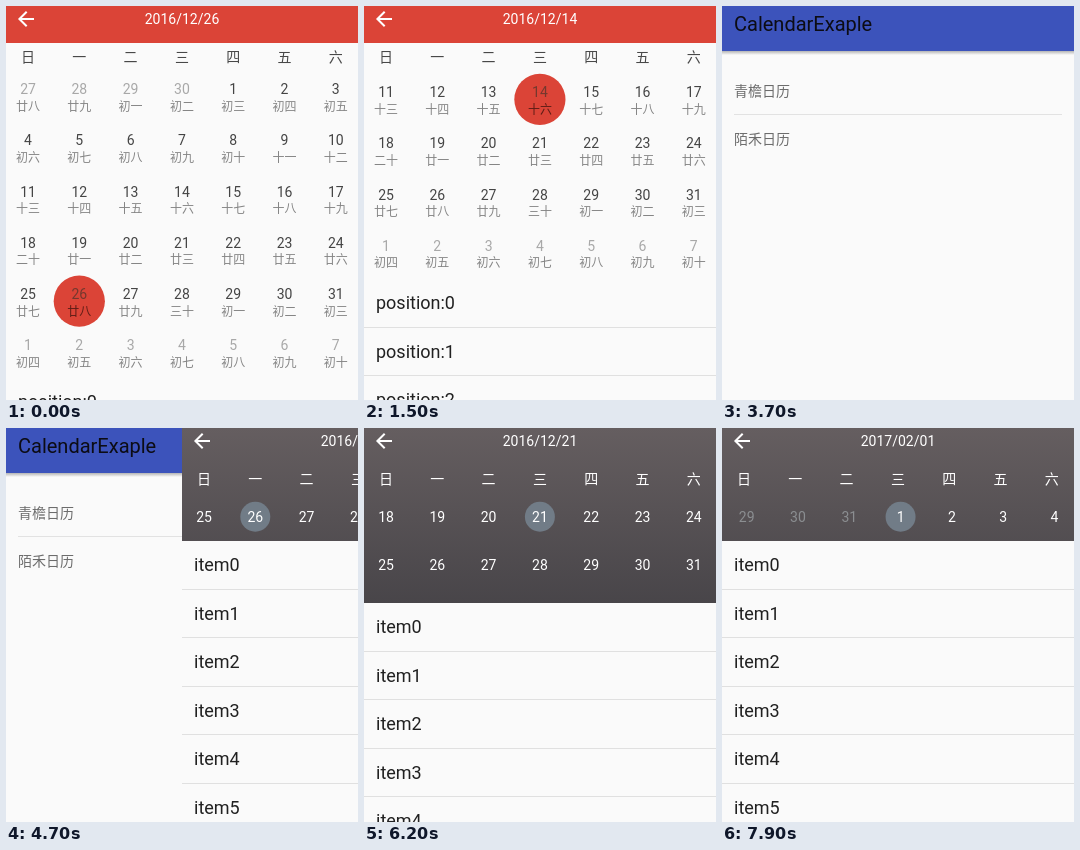
An HTML page with a canvas for the animation above (8000 ms loop, 352x394 px).

```html
<!DOCTYPE html>
<html lang="zh">
<head>
<meta charset="utf-8">
<title>Calendar</title>
<style>
html, body { margin: 0; width: 100%; height: 100%; overflow: hidden; background: #fafafa; }
canvas { display: block; width: 352px; height: 394px; }
</style>
</head>
<body>
<canvas id="stage" width="352" height="394"></canvas>
<script>
const W = 352, H = 394, LOOP = 8000, STEP = 100;
const COL = 51.3, LEFT = 22, PAGE = COL * 7, ITEM = 48.5, GRID_TOP = 64.8;
const DAY = 864e5, LUNATION = 29.53, NEW_MOON = Date.UTC(2016, 9, 31);
const CJK = '"Noto Sans CJK SC", "Noto Sans CJK", sans-serif';
const LATIN = 'Roboto, ' + CJK;
const ctx = document.getElementById('stage').getContext('2d');

const smooth = x => x * x * (3 - 2 * x);
const square = x => x * x;

// Eased progress 0..1 of a gesture
function move(t, start, length, ease = smooth) {
  return ease(Math.min(1, Math.max(0, (t - start) / length)));
}

function fill(color, x, y, w, h) {
  ctx.fillStyle = color;
  ctx.fillRect(x, y, w, h);
}

function text(str, x, y, size, color, align = 'left', family = LATIN) {
  ctx.font = size + 'px ' + family;
  ctx.textAlign = align;
  ctx.fillStyle = color;
  ctx.fillText(str, x, y);
}

function shade(y0, y1, ...colors) {
  const g = ctx.createLinearGradient(0, y0, 0, y1);
  colors.forEach((c, i) => g.addColorStop(i / (colors.length - 1), c));
  return g;
}

function clip(x, y, w, h) {
  ctx.beginPath();
  ctx.rect(x, y, w, h);
  ctx.clip();
}

const red = {
  row: 51.2, drop: -2.3, radius: 25.6, circle: '#db4437', lunar: true,
  ink: '#444', dim: '#a8a8a8', week: '#484848', picked: '#74382e',
  item: 'position:', pad: 1,
  back() {
    fill('#fafafa', 0, 0, W, H);
    fill('#db4437', 0, 0, W, 37);
  }
};

const dark = {
  row: 47.9, drop: 5.1, radius: 15, circle: '#717c87', lunar: false,
  ink: '#fff', dim: '#8b8e91', week: '#fff', picked: '#fff',
  item: 'item', pad: 2,
  back() {
    fill(shade(0, 352, '#655e60', '#484549', '#2a2a30'), 0, 0, W, H);
  }
};

function lunarDay(time) {
  const days = (time - NEW_MOON) / DAY;
  const month = Math.ceil((days + 0.55) / LUNATION) - 1;
  const n = days - Math.floor(0.45 + month * LUNATION) + 1;
  const unit = '十一二三四五六七八九'[n % 10];
  if (n <= 10) return '初' + unit;
  if (n === 20) return '二十';
  if (n === 30) return '三十';
  return (n < 20 ? '十' : '廿') + unit;
}

// Months count from January 2016
function gridStart(month) {
  const first = Date.UTC(2016, month, 1);
  return first - new Date(first).getUTCDay() * DAY;
}

function drawMonth(look, month, dx, dy, picked) {
  for (let i = 0; i < 42; i++) {
    const time = gridStart(month) + i * DAY, date = new Date(time);
    const x = LEFT + (i % 7) * COL + dx;
    const y = GRID_TOP + (Math.floor(i / 7) + 0.5) * look.row + dy;
    const inside = date.getUTCMonth() === month % 12;
    const on = inside && time === picked;
    if (on) {
      ctx.fillStyle = look.circle;
      ctx.beginPath();
      ctx.arc(x, y, look.radius, 0, 7);
      ctx.fill();
    }
    const ink = on ? look.picked : inside ? look.ink : look.dim;
    text(date.getUTCDate(), x, y + look.drop, 14, ink, 'center');
    if (look.lunar) text(lunarDay(time), x, y + 14.3, 12, on ? '#5e1d16' : '#858585', 'center', CJK);
  }
}

function drawArrow() {
  ctx.strokeStyle = '#fff';
  ctx.lineWidth = 2;
  ctx.beginPath();
  ctx.moveTo(28, 13);
  ctx.lineTo(14, 13);
  ctx.moveTo(20.7, 5.7);
  ctx.lineTo(13.4, 13);
  ctx.lineTo(20.7, 20.3);
  ctx.stroke();
}

function dateTitle(look, time) {
  const d = new Date(time);
  const pad = n => String(n).padStart(look.pad, '0');
  return [d.getUTCFullYear(), pad(d.getUTCMonth() + 1), pad(d.getUTCDate())].join('/');
}

// page: month position, fold: 0 open to 1 single week, day: choice in December
function drawCalendar(look, { page, fold, day }) {
  const month = Math.round(page);
  const picked = Date.UTC(2016, month, month > 11 ? 1 : day);
  const row = Math.floor((picked - gridStart(month)) / DAY / 7);
  const shift = fold * look.row * 5;

  look.back();
  drawArrow();
  text(dateTitle(look, picked), 176, 18, 14, '#fff', 'center');
  [...'日一二三四五六'].forEach((c, i) =>
    text(c, LEFT + i * COL, 56, 14, look.week, 'center', CJK));

  ctx.save();
  clip(0, GRID_TOP, W, H);
  const first = Math.floor(page), dy = -Math.min(shift, row * look.row);
  for (let m = first; m <= first + 1; m++) drawMonth(look, m, (m - page) * PAGE, dy, picked);
  ctx.restore();

  const top = Math.round(GRID_TOP + look.row * 6 - shift);
  fill('#fafafa', 0, top, W, H);
  for (let i = 0, y = top; y < H; i++, y += ITEM) {
    text(look.item + i, 12, y + 30.2, 18, '#212121');
    fill('#e0e0e0', 0, Math.round(y + ITEM - 1), W, 1);
  }
}

function drawHome() {
  fill('#fafafa', 0, 0, W, H);
  fill(shade(45, 49, 'rgba(0,0,0,.28)', 'rgba(0,0,0,0)'), 0, 45, W, 4);
  fill('#3c53bb', 0, 0, W, 45);
  text('CalendarExaple', 12, 24.5, 20, '#0c0c14');
  ['青檐日历', '陌禾日历'].forEach((name, i) =>
    text(name, 12, 90 + i * 48, 14, '#6c6c6c', 'left', CJK));
  fill('#e2e2e2', 12, 108, 328, 1);
}

function redState(t) {
  return {
    day: t < 300 ? 26 : 14,
    fold: move(t, 500, 300) - move(t, 900, 767, square),
    page: 11 + move(t, 1900, 790) + move(t, 2750, 550)
  };
}

function darkState(t) {
  const fling = start => move(t, start, 300);
  return {
    day: t < 5800 ? 26 : 21,
    fold: 1 - fling(5100) + fling(6000) - fling(6500) + fling(6900),
    page: 11 + move(t, 7300, 316) + move(t, 7600, 316)
  };
}

function draw(t) {
  const early = t < 4000;
  const slide = W * (early ? move(t, 3300, 400) : 1 - move(t, 4500, 400));
  if (slide > 0) drawHome();
  if (slide >= W) return;
  ctx.save();
  ctx.translate(slide, 0);
  clip(0, 0, W, H);
  if (early) drawCalendar(red, redState(t));
  else drawCalendar(dark, darkState(t));
  ctx.restore();
}

const began = performance.now();
function tick() {
  const t = (performance.now() - began) % LOOP;
  draw(Math.floor(t / STEP) * STEP);
  requestAnimationFrame(tick);
}
tick();
</script>
</body>
</html>
```
